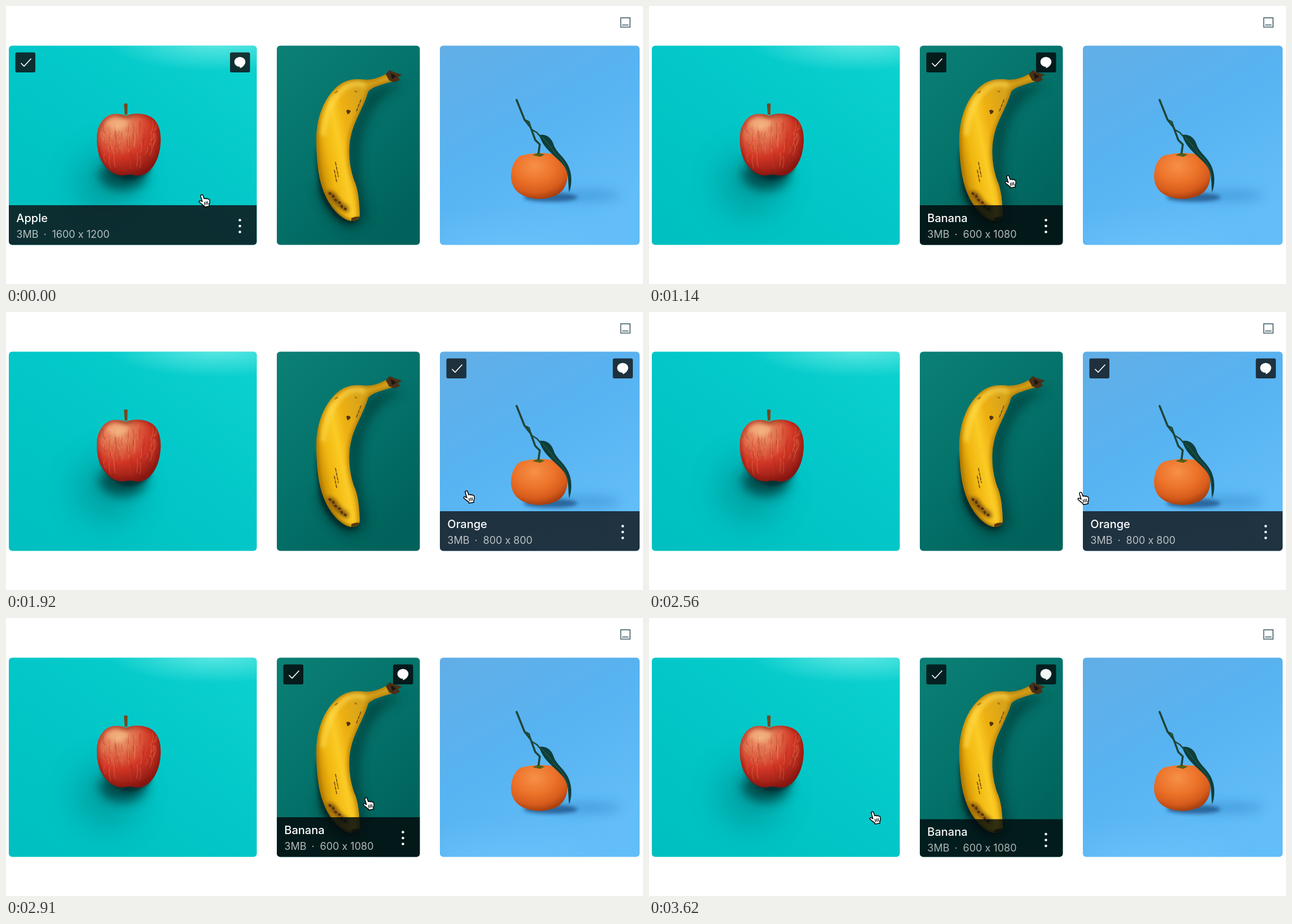
Recreate the animation shown at these times as an HTML page. Size 1129 px wide and 494 px high, loop 3.69 s.

```html
<!DOCTYPE html>
<html lang="en">
<head>
<meta charset="utf-8">
<title>Image cards</title>
<style>
  html, body { margin: 0; width: 100%; height: 100%; overflow: hidden; background: #fff; }
  svg { display: block; width: 100%; height: 100%; }
  text { font-family: Inter, Roboto, sans-serif; }
  .title { font-size: 20px; font-weight: 500; fill: #fff; }
  .meta { font-size: 18px; fill: #fff; fill-opacity: .7; }
</style>
</head>
<body>
<svg id="stage" viewBox="0 0 1129 494">
  <defs>
    <filter id="blur3" filterUnits="userSpaceOnUse" x="0" y="0" width="1129" height="494"><feGaussianBlur stdDeviation="3"/></filter>
    <filter id="blur10" filterUnits="userSpaceOnUse" x="0" y="0" width="1129" height="494"><feGaussianBlur stdDeviation="10"/></filter>
    <filter id="blur26" filterUnits="userSpaceOnUse" x="-100" y="-100" width="1329" height="694"><feGaussianBlur stdDeviation="26"/></filter>

    <linearGradient id="tealBg" x1="0" y1="1" x2=".9" y2="0">
      <stop offset="0" stop-color="#00bfc0"/><stop offset=".5" stop-color="#02c6c7"/><stop offset="1" stop-color="#0bd1cf"/>
    </linearGradient>
    <radialGradient id="glow">
      <stop offset="0" stop-color="#7df0ea" stop-opacity=".75"/><stop offset="1" stop-color="#7df0ea" stop-opacity="0"/>
    </radialGradient>
    <linearGradient id="greenBg" x1="0" y1="0" x2=".7" y2="1">
      <stop offset="0" stop-color="#0c8076"/><stop offset=".5" stop-color="#04736b"/><stop offset="1" stop-color="#00625b"/>
    </linearGradient>
    <linearGradient id="blueBg" x1="0" y1="0" x2=".6" y2="1">
      <stop offset="0" stop-color="#62aee6"/><stop offset=".5" stop-color="#57b3f1"/><stop offset="1" stop-color="#63bdf8"/>
    </linearGradient>
    <radialGradient id="appleSkin" cx=".33" cy=".2" r=".85">
      <stop offset="0" stop-color="#f0a878"/><stop offset=".28" stop-color="#e07350"/>
      <stop offset=".6" stop-color="#d03524"/><stop offset="1" stop-color="#861712"/>
    </radialGradient>
    <linearGradient id="bananaSkin" gradientUnits="userSpaceOnUse" x1="549" y1="250" x2="640" y2="232">
      <stop offset="0" stop-color="#c98d05"/><stop offset=".2" stop-color="#f0b60f"/><stop offset=".45" stop-color="#fbcb25"/>
      <stop offset=".65" stop-color="#eeb012"/><stop offset="1" stop-color="#d9a41a"/>
    </linearGradient>
    <radialGradient id="orangeSkin" cx=".42" cy=".28" r=".72">
      <stop offset="0" stop-color="#f79048"/><stop offset=".5" stop-color="#ec7229"/>
      <stop offset=".8" stop-color="#d75c1c"/><stop offset="1" stop-color="#a8400f"/>
    </radialGradient>

    <path id="appleShape" d="M213 195C226 189 250 190 262 201C275 213 277 239 271 262C266 283 252 300 236 301C228 302 222 298 214 300C201 303 190 299 181 290C169 279 161 262 161 238C160 214 172 195 190 192C200 191 207 192 213 195Z"/>
    <path id="bananaShape" d="M678 118C662 128 650 131 637 131C617 128 599 131 584 146C560 170 549 205 550 245C551 285 555 315 568 341C578 361 596 381 613 382C622 382 627 377 627 370C626 345 624 325 617 310C608 285 606 255 611 232C616 205 634 180 642 152C648 144 664 140 688 133Z"/>
    <clipPath id="appleClip"><use href="#appleShape"/></clipPath>
    <clipPath id="bananaClip"><use href="#bananaShape"/></clipPath>
  </defs>

  <g fill="none" stroke="#587078" stroke-width="1.8">
    <rect x="1089.5" y="21" width="16.5" height="16.5"/>
    <path d="M1092 33.7H1103.5"/>
  </g>

  <g id="apple">
    <rect x="5" y="70" width="440" height="355" fill="url(#tealBg)"/>
    <ellipse cx="370" cy="64" rx="190" ry="52" fill="url(#glow)"/>
    <ellipse cx="180" cy="315" rx="58" ry="58" fill="#007f80" opacity=".45" filter="url(#blur26)"/>
    <ellipse cx="207" cy="300" rx="42" ry="27" fill="#023f40" opacity=".85" filter="url(#blur10)"/>
    <path d="M167 264Q182 302 212 309Q242 309 258 288L220 260Z" fill="#022c2d" opacity=".8" filter="url(#blur3)"/>
    <use href="#appleShape" fill="url(#appleSkin)"/>
    <g clip-path="url(#appleClip)">
      <g id="streaks" fill="none"></g>
      <use href="#appleShape" fill="none" stroke="#85160f" stroke-width="7" opacity=".5" filter="url(#blur3)"/>
      <ellipse cx="198" cy="209" rx="20" ry="9" fill="#f5c08a" opacity=".5" filter="url(#blur3)"/>
      <ellipse cx="213" cy="194" rx="15" ry="4" fill="#9a4f25" opacity=".6" filter="url(#blur3)"/>
    </g>
    <path d="M210.500 193L209 174Q213 172 215.500 174L215 193Z" fill="#74481f"/>
  </g>

  <g id="banana">
    <rect x="479" y="70" width="255" height="355" fill="url(#greenBg)"/>
    <path d="M642 152Q690 130 702 140Q660 160 646 190Q622 230 626 300L640 375Q620 405 596 392Q560 370 552 320L606 300L606 230Z" fill="#003835" opacity=".75" filter="url(#blur10)"/>
    <path d="M551 250Q546 335 575 366Q600 395 624 383L600 340Z" fill="#022422" opacity=".75" filter="url(#blur3)"/>
    <use href="#bananaShape" fill="url(#bananaSkin)"/>
    <g clip-path="url(#bananaClip)">
      <use href="#bananaShape" fill="none" stroke="#8a5a05" stroke-width="6" opacity=".6" filter="url(#blur3)"/>
      <path d="M562 230Q570 165 605 142Q625 134 636 142" fill="none" stroke="#ffe05c" stroke-width="10" opacity=".5" filter="url(#blur3)"/>
      <path d="M556 325Q580 372 615 386L560 390Z" fill="#5d3a06" opacity=".75" filter="url(#blur3)"/>
      <path d="M568 329Q577 327 585 334Q593 349 606 356Q610 365 604 367Q588 362 574 342Z" fill="#6d430c" opacity=".75" filter="url(#blur3)"/>
      <path d="M572 332l7 4l4 8l9 6l4 8l8 4" fill="none" stroke="#55330a" stroke-width="4" stroke-dasharray="5 3"/>
      <path d="M612 377Q620 373 628 375V384H612Z" fill="#59370b"/>
      <path d="M584 278L589 303M582 292L586 312M629 167L621 187" fill="none" stroke="#7d500c" stroke-width="1.8" stroke-linecap="round" stroke-dasharray="5 3"/>
      <path d="M603 186Q607 182 611 187Q608 193 605 192Z" fill="#51340b"/>
      <path d="M583 155l5 -4M618 151l4 2" stroke="#a06e10" stroke-width="2"/>
    </g>
    <path d="M673 121L680 114L689 118L702 122L695 126L698 131L689 136L679 132Z" fill="#49301a"/>
    <path d="M682 119L692 125L684 130Z" fill="#1e160f"/>
  </g>

  <g id="orange">
    <rect x="768" y="70" width="356" height="355" fill="url(#blueBg)"/>
    <ellipse cx="890" cy="425" rx="140" ry="30" fill="#72c6fd" opacity=".5" filter="url(#blur26)"/>
    <ellipse cx="1030" cy="337" rx="60" ry="8" fill="#2c7fc2" opacity=".55" filter="url(#blur10)"/>
    <ellipse cx="965" cy="340" rx="48" ry="8" fill="#1c4f83" opacity=".75" filter="url(#blur3)"/>
    <path d="M912 266Q945 257 978 265Q995 277 995 302Q994 326 976 336Q945 350 915 336Q896 326 895 303Q896 276 912 266Z" fill="url(#orangeSkin)"/>
    <path d="M933 265L943 261L955 264L947 268Z" fill="#526019"/>
    <path d="M945 229C958 227 967 234 971 247C976 262 993 270 999 290C1004 305 1002 321 998 331C996 314 998 300 990 286C978 268 953 257 945 229Z" fill="#0d3e3b"/>
    <path d="M950 233Q966 250 975 264Q992 276 997 304" fill="none" stroke="#245a4c" stroke-width="1.1"/>
    <g fill="none" stroke="#1f4637" stroke-linecap="round" stroke-linejoin="round">
      <path d="M905 167L919 202L930 216L938 238L946 246L944 261" stroke-width="3.6"/>
      <path d="M921 203L927 206L931 219L941 225L947 232" stroke-width="2.6"/>
    </g>
  </g>

  <g id="cursor" stroke="#000" stroke-width="1.5" stroke-linejoin="round" stroke-linecap="round">
    <path fill="#fff" d="M4 4.2C3.4 1.2 7.5 .3 8.3 3L10.2 8.6C11.5 7.2 13.5 7.5 14 8.9C15.5 7.6 17 8 17.3 9.4C18.8 8.8 19.8 9.6 20 11.3C20.5 14 20 17 19 18.7L19.3 21.7L10.6 23.2L10 21C7 19.5 5 17 1.8 14.6C.3 13 2 11.1 4.2 12.2L6.9 13.7Z"/>
    <path fill="none" stroke-width="1.3" d="M10.6 14.6L11.5 19M13.4 14L14.2 18.5M16.1 13.5L16.8 18"/>
  </g>
</svg>

<script>
const $ = id => document.getElementById(id);
const LOOP = 3690, STEP = 70, BAR = 71;
const TOP = 70.5, BOTTOM = 424.5;

const cards = [
  { id: 'apple', x: 5, w: 439.5, title: 'Apple', size: '1600 x 1200', shade: 'rgba(15,20,24,.85)',
    shown: [[0, 1], [1000, .95], [1070, .45], [1140, 0]] },
  { id: 'banana', x: 480, w: 253.5, title: 'Banana', size: '600 x 1080', shade: 'rgba(4,12,14,.86)',
    shown: [[1000, 0], [1140, 1], [1640, 1], [1710, .95], [1780, .45], [1850, 0],
            [2630, 0], [2700, .25], [2770, .8], [2840, 1], [3550, 1], [3620, .95]] },
  { id: 'orange', x: 769, w: 354, title: 'Orange', size: '800 x 800', shade: 'rgba(20,29,34,.86)',
    shown: [[1710, 0], [1780, .25], [1850, .8], [1920, 1],
            [2560, 1], [2630, .95], [2700, .45], [2770, 0]] }
];

const pointer = [
  [0, 351, 346], [1000, 516, 313], [1140, 640, 312], [1640, 734, 321], [1710, 786, 325],
  [1850, 817, 328], [1920, 820, 328.5], [2060, 820, 329], [2560, 769, 331], [2630, 715, 331],
  [2770, 655, 331], [2910, 642, 330], [3410, 628, 331], [3480, 570, 338], [3620, 400, 355]
];

// The picture moves in short bursts and rests between them.
const bursts = [[1000, 1140], [1640, 2060], [2560, 2910], [3410, 3620]];

function overlay({ x, w, title, size, shade }) {
  const right = x + w;
  const button = left => `<rect x="${left}" y="82.5" width="35.5" height="35.5" rx="3" fill="${shade}"/>`;
  const dots = [380.5, 391, 401.5].map(y => `<circle cx="${right - 30}" cy="${y}" r="2.3" fill="#fff"/>`).join('');
  return `<g class="tools">
      ${button(x + 11.5)}${button(right - 47.5)}
      <path d="M${x + 21.5} 101.5l5.5 5.500l12.500 -13.500" fill="none" stroke="#fff" stroke-width="1.7"/>
      <ellipse cx="${right - 30}" cy="99.300" rx="9.800" ry="8.800" fill="#fff"/>
      <path d="M${right - 30} 106v4.500q5 -1.500 8 -6z" fill="#fff"/>
    </g>
    <g class="bar">
      <rect x="${x}" y="354" width="${w}" height="${BAR}" fill="${shade}"/>
      <text class="title" x="${x + 13.3}" y="383.700">${title}</text>
      <g class="meta">
        <text x="${x + 13.3}" y="411.500">3MB</text>
        <text x="${x + 64}" y="411.500" text-anchor="middle">·</text>
        <text x="${x + 76.5}" y="411.500">${size}</text>
      </g>
      ${dots}
    </g>`;
}

for (const card of cards) {
  const group = $(card.id);
  const clip = `${card.id}Card`;
  group.setAttribute('clip-path', `url(#${clip})`);
  group.insertAdjacentHTML('beforeend', overlay(card));
  group.insertAdjacentHTML('beforebegin',
    `<clipPath id="${clip}"><rect x="${card.x}" y="${TOP}" width="${card.w}" height="${BOTTOM - TOP}" rx="6"/></clipPath>`);
  card.tools = group.querySelector('.tools');
  card.bar = group.querySelector('.bar');
}

const noise = n => Math.abs(Math.sin(n * 127.1) * 43758.5) % 1;
const tones = ['#f0a060', '#a81e1a', '#e0402a'];
$('streaks').innerHTML = Array.from({ length: 100 }, (_, i) => {
  const side = noise(i) * 2 - 1;
  const y = 198 + noise(i + 180) * 70;
  const x = 216 + side * 52;
  const length = 8 + noise(i + 360) * 20;
  return `<path d="M${x} ${y}q${side * 5} ${length / 2} ${-side * 3} ${length}" stroke="${tones[i % 3]}" stroke-width="1.5" opacity=".28"/>`;
}).join('');

function sample(keys, t) {
  const next = keys.findIndex(key => key[0] > t);
  if (next === 0) return keys[0].slice(1);
  if (next < 0) return keys[keys.length - 1].slice(1);
  const a = keys[next - 1], b = keys[next];
  const k = (t - a[0]) / (b[0] - a[0]);
  return a.slice(1).map((v, i) => v + (b[i + 1] - v) * k);
}

function snap(t) {
  const burst = bursts.filter(([start]) => t >= start).pop();
  if (!burst) return 0;
  const [start, end] = burst;
  return Math.min(end, start + Math.floor((t - start) / STEP) * STEP);
}

const origin = performance.now();
function draw(now) {
  const t = snap(Math.max(0, now - origin) % LOOP);
  for (const { shown, tools, bar } of cards) {
    const [v] = sample(shown, t);
    tools.setAttribute('opacity', v);
    bar.setAttribute('opacity', v);
    bar.setAttribute('transform', `translate(0 ${(1 - v) * BAR})`);
  }
  const [x, y] = sample(pointer, t);
  $('cursor').setAttribute('transform', `translate(${x - 10} ${y - 12})`);
  requestAnimationFrame(draw);
}
draw(origin);
</script>
</body>
</html>
```
